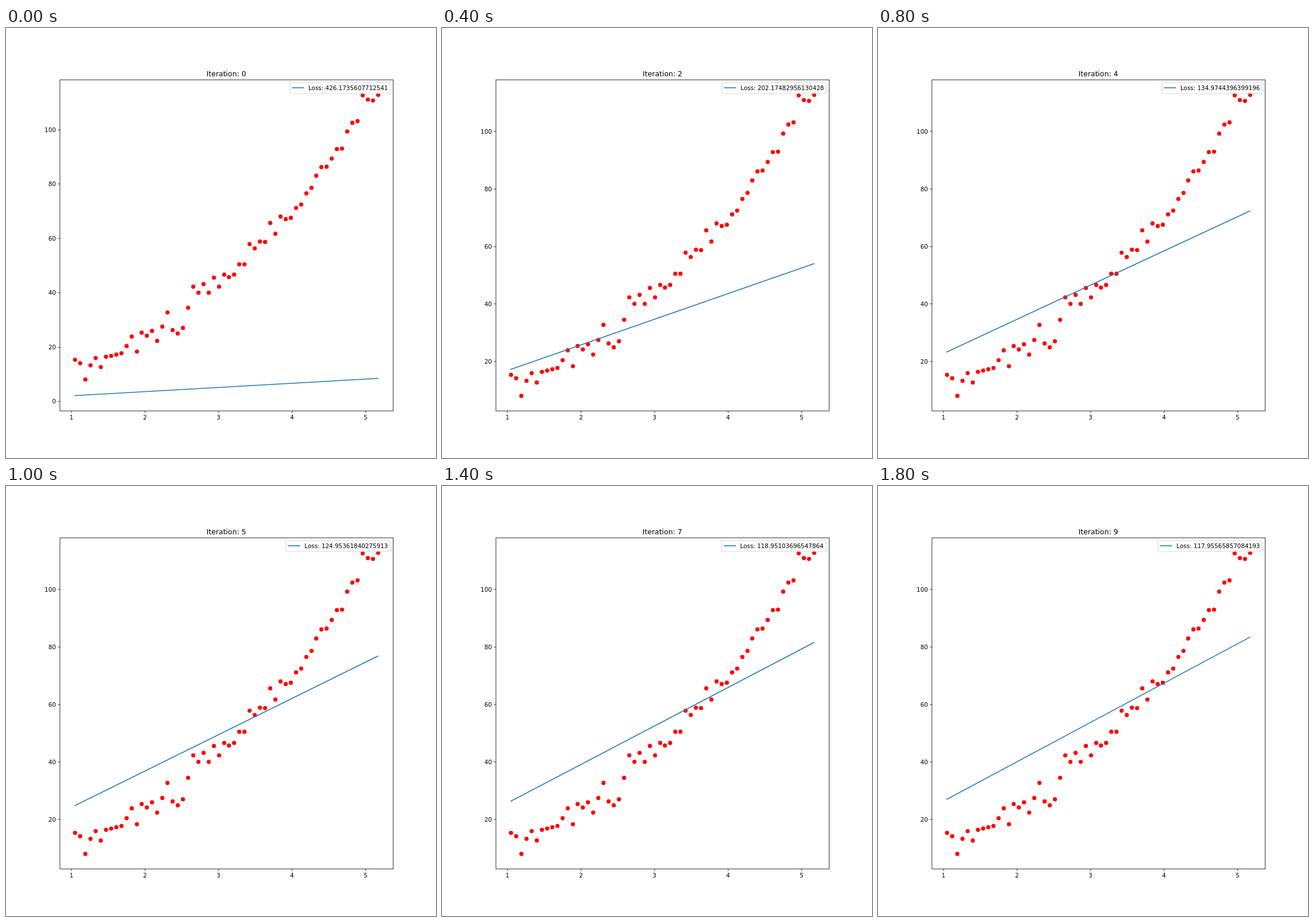
Animation of 748x748 px, one loop 2 s. Source, as an HTML page with a canvas:

```html
<!DOCTYPE html>
<html lang="en">
<head>
<meta charset="utf-8">
<title>Line fit</title>
<style>
  html, body { margin: 0; width: 100%; height: 100%; overflow: hidden; background: #fff; }
  canvas { display: block; }
</style>
</head>
<body>
<canvas id="plot" width="748" height="748"></canvas>
<script>
const ctx = document.getElementById('plot').getContext('2d');

// The figure is laid out on a 1000 x 1000 sheet at 100 dpi.
const SCALE = 0.748, PT = 100 / 72, EM = 10 * PT;
const BOX = { left: 125, right: 900, top: 120, bottom: 890 };
const STEP_MS = 200, STEPS = 10;
const BLUE = '#1f77b4';

const LOSS = [
  '426.1735607712541', '284.93055797274593', '202.17482956130428',
  '157.18816023929475', '134.9744396399196', '124.95361840275913',
  '120.7009268593687', '118.95103696547864', '118.24183572960417',
  '117.95565857084193'
];

// Sample heights on the sheet, on the axis that spans the samples alone.
const HEIGHTS = [
  806, 814, 855, 820, 802, 824, 799, 796, 793, 790, 772, 749, 786, 739, 747,
  735, 759, 725, 690, 733, 742, 728, 678, 626, 641, 620, 641, 604, 626, 597,
  603, 597, 571, 571, 522, 532, 515, 516, 470, 496, 454, 460, 457, 433, 424,
  397, 383, 354, 333, 331, 311, 288, 287, 245, 224, 219, 156, 167, 169, 155
];
const Y_MIN = 8.02, Y_MAX = 112.73;
const samples = HEIGHTS.map((h, i) => ({
  x: (60 + 4 * i) * Math.PI / 180,
  y: Y_MIN + (855 - h) * (Y_MAX - Y_MIN) / 700
}));
const X_MIN = samples[0].x, X_MAX = samples[samples.length - 1].x;

// Gradient descent closes the same share of the gap on every step.
const approach = (from, to, n) => to - (to - from) * 0.6345 ** n;
const snap = v => Math.round(v) + 0.5;
const toX = x => 160.227 + (x - X_MIN) * 704.545 / (X_MAX - X_MIN);

function stroke(color, width, ...points) {
  ctx.strokeStyle = color;
  ctx.lineWidth = width;
  ctx.beginPath();
  points.forEach(([x, y]) => ctx.lineTo(x, y));
  ctx.stroke();
}

// Places text by its inked width; align 0 = left, 0.5 = centre, 1 = right.
function label(text, x, y, align, size = EM) {
  ctx.font = `${size}px "DejaVu Sans", sans-serif`;
  ctx.fillStyle = '#000';
  const m = ctx.measureText(text);
  const width = m.actualBoundingBoxLeft + m.actualBoundingBoxRight;
  const left = x - width * align;
  ctx.fillText(text, left + m.actualBoundingBoxLeft, y);
  return left;
}

function drawAxes(toY) {
  const { left, right, top, bottom } = BOX, tick = 3.5 * PT;
  for (let v = 1; v <= 5; v++) {
    const x = snap(toX(v));
    stroke('#000', 1.11, [x, bottom + 0.5], [x, bottom + 0.5 + tick]);
    label(String(v), toX(v), 911, 0.5);
  }
  for (let v = 0; v <= 100; v += 20) {
    const y = snap(toY(v));
    if (y > bottom) continue;
    stroke('#000', 1.11, [left + 0.5, y], [left + 0.5 - tick, y]);
    label(String(v), left - 2 * tick, y + 5, 1);
  }
  ctx.strokeStyle = '#000';
  ctx.lineWidth = 1.11;
  ctx.strokeRect(left + 0.5, top + 0.5, right - left, bottom - top);
}

function drawLegend(text) {
  const right = 893.05, top = 126.95, bottom = 152.4, pad = 0.4 * EM;
  ctx.font = `${EM}px "DejaVu Sans", sans-serif`;
  const m = ctx.measureText(text);
  const textLeft = right - pad - m.actualBoundingBoxLeft - m.actualBoundingBoxRight;
  const handle = textLeft - 2.8 * EM;
  ctx.beginPath();
  ctx.roundRect(handle - pad, top, right - handle + pad, bottom - top, 0.2 * EM);
  ctx.globalAlpha = 0.8;
  ctx.fillStyle = '#fff';
  ctx.fill();
  ctx.strokeStyle = '#ccc';
  ctx.lineWidth = PT;
  ctx.stroke();
  ctx.globalAlpha = 1;
  stroke(BLUE, 1.5 * PT, [handle, 139], [handle + 2 * EM, 139]);
  label(text, textLeft, 144, 0);
}

function draw(n) {
  const start = approach(2.08, 27.35, n), end = approach(8.4, 84.6, n);
  const low = Math.min(Y_MIN, start);
  const toY = y => 855 - (y - low) * 700 / (Y_MAX - low);

  ctx.setTransform(1, 0, 0, 1, 0, 0);
  ctx.fillStyle = '#fff';
  ctx.fillRect(0, 0, 748, 748);
  ctx.scale(SCALE, SCALE);

  ctx.fillStyle = '#f00';
  for (const p of samples) {
    ctx.beginPath();
    ctx.arc(snap(toX(p.x)), snap(toY(p.y)), 3.5 * PT, 0, 2 * Math.PI);
    ctx.fill();
  }
  ctx.lineCap = 'square';
  stroke(BLUE, 1.5 * PT, [toX(X_MIN), toY(start)], [toX(X_MAX), toY(end)]);
  ctx.lineCap = 'butt';

  drawAxes(toY);
  label(`Iteration: ${n}`, 512.5, 111.7, 0.5, 12 * PT);
  drawLegend(`Loss: ${LOSS[n]}`);
}

let shown = 0;
const began = performance.now();
function tick() {
  const n = Math.floor(Math.max(0, performance.now() - began) / STEP_MS) % STEPS;
  if (n !== shown) draw(shown = n);
  requestAnimationFrame(tick);
}
draw(0);
requestAnimationFrame(tick);
</script>
</body>
</html>
```
